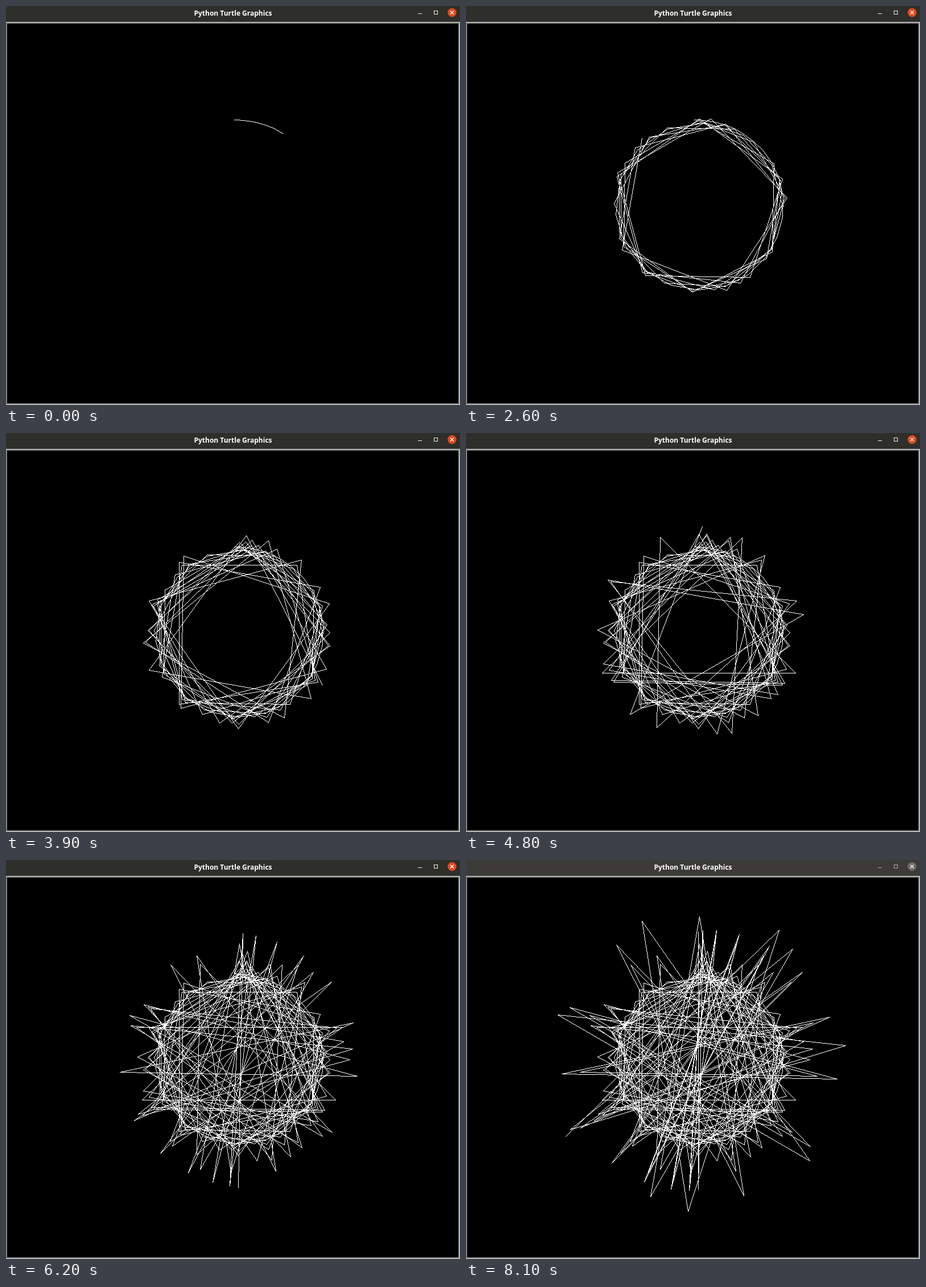
An HTML page with a canvas for the animation above (8300 ms loop, 798 px wide and 702 px high).

```html
<!DOCTYPE html>
<html>
<head>
<meta charset="utf-8">
<style>
  html, body { margin: 0; width: 100%; height: 100%; overflow: hidden; background: #000; }
  canvas { display: block; }
</style>
</head>
<body>
<canvas id="stage" width="798" height="702"></canvas>
<script>
const ctx = document.getElementById('stage').getContext('2d');
const LOOP = 8300, TICK = 100, BLUR_TIME = 8100;
const START_X = 400.6, START_Y = 200.35;
const SCALE_X = 798 / 800; // the window is shown slightly narrowed

// Drawing pace: [tick, segments drawn], linear in between
const pace = [[0, 8], [16, 52], [26, 80], [36, 108], [39, 118], [56, 164], [63, 181],
              [68, 195], [72, 205], [73, 207], [74, 207], [75, 209]];

// Turtle walk: each step is 2.5 px longer and turns one degree further right
const points = [[Math.round(START_X), Math.round(START_Y)]];
for (let step = 1, x = 0, y = 0, heading = 0; step < 210; step++) {
  const angle = heading * Math.PI / 180;
  x += 2.5 * step * Math.cos(angle);
  y += 2.5 * step * Math.sin(angle);
  heading += step;
  points.push([Math.round(START_X + x * SCALE_X), Math.round(START_Y + y)]);
}

function segmentsAt(tick) {
  const i = pace.findIndex(([t]) => t > tick);
  if (i < 0) return points.length - 1;
  const [t0, n0] = pace[i - 1], [t1, n1] = pace[i];
  return Math.round(n0 + (n1 - n0) * (tick - t0) / (t1 - t0));
}

function rect(color, x, y, w, h) {
  ctx.fillStyle = color;
  ctx.fillRect(x, y, w, h);
}

// One pixel wide line without smoothing
function pixelLine([x0, y0], [x1, y1]) {
  const dx = x1 - x0, dy = y1 - y0;
  const count = Math.max(Math.abs(dx), Math.abs(dy), 1);
  for (let i = 0; i <= count; i++) {
    ctx.fillRect(Math.round(x0 + dx * i / count), Math.round(y0 + dy * i / count), 1, 1);
  }
}

function drawWindow(focused) {
  const icon = focused ? '#f2f1ed' : '#aaa9a4';
  rect(focused ? '#2e2f2a' : '#3c3b37', 0, 0, 798, 28);
  rect('#d9d9d9', 0, 28, 798, 674);
  rect('#828282', 0, 29, 797, 672);
  rect('#000', 2, 31, 793, 668);

  ctx.fillStyle = '#fff';
  ctx.font = 'bold 12px "Open Sans", sans-serif';
  ctx.textAlign = 'center';
  ctx.fillText('Python Turtle Graphics', 399, 17);

  rect(icon, 724, 13, 7, 1);
  ctx.lineWidth = 1;
  ctx.strokeStyle = icon;
  ctx.strokeRect(752.5, 8.5, 6, 6);

  ctx.fillStyle = focused ? '#e0491f' : '#6b6a66';
  ctx.beginPath();
  ctx.arc(784, 11.5, 7.8, 0, 2 * Math.PI);
  ctx.fill();
  ctx.strokeStyle = '#fff';
  ctx.lineWidth = 1.2;
  ctx.beginPath();
  ctx.moveTo(781, 8.5);
  ctx.lineTo(787, 14.5);
  ctx.moveTo(787, 8.5);
  ctx.lineTo(781, 14.5);
  ctx.stroke();
}

let shownTick = -1;
function render(now) {
  const tick = Math.floor(now % LOOP / TICK);
  if (tick !== shownTick) {
    shownTick = tick;
    drawWindow(tick * TICK < BLUR_TIME);
    ctx.fillStyle = '#fff';
    const count = segmentsAt(tick);
    for (let i = 0; i < count; i++) pixelLine(points[i], points[i + 1]);
  }
  requestAnimationFrame(render);
}
render(performance.now());
</script>
</body>
</html>
```
